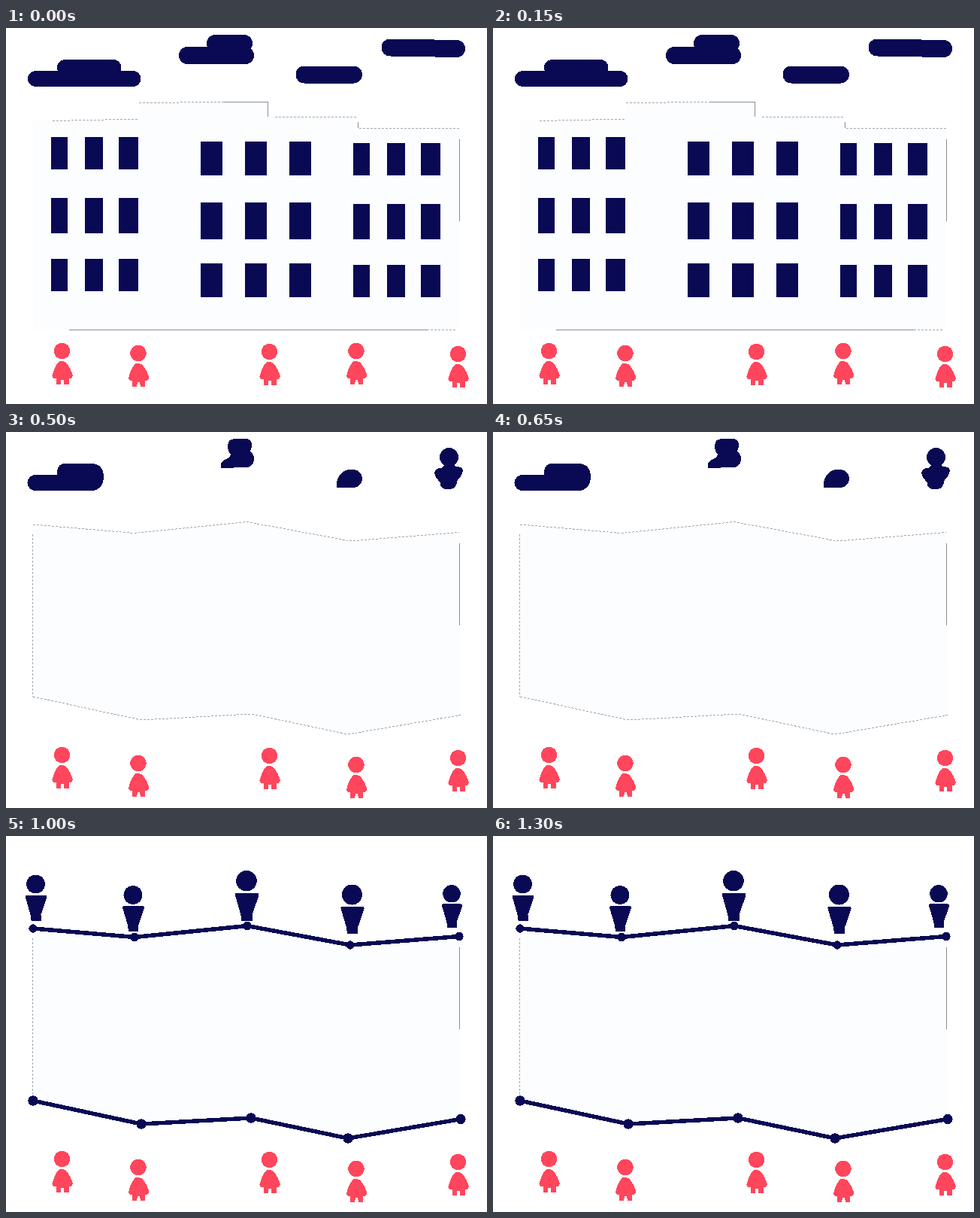
Recreate the animation shown at these times as an HTML page. Size 640x500 px, loop 1500 ms.

```html
<!DOCTYPE html>
<html lang="en">
<head>
<meta charset="utf-8">
<title>Building becomes a line chart</title>
<style>
html, body { margin: 0; height: 100%; overflow: hidden; background: #fff; }
svg { display: block; shape-rendering: crispEdges; }
.navy { fill: #090954; }
.red { fill: #ff465c; }
.wall { fill: #fcfdff; }
.edge, .line, .pill { fill: none; }
.edge { stroke: #8b8d91; }
.faint { stroke: #a5a7ab; stroke-dasharray: 3 2; }
.line, .pill { stroke: #090954; }
.line { stroke-width: 5.5; }
.pill { stroke-linecap: round; }
</style>
</head>
<body>
<!-- data-steps lists the steps in which a part is visible -->
<svg id="stage" width="640" height="500">
  <defs>
    <g id="girl">
      <circle r="10.7"/>
      <path d="M-4 14Q0 12.5 5 15Q12 23 14.5 33Q13 37 9 37V44.5H3L2 38H-1L-2 44.5H-8V37Q-12 37-13 33Q-10 20-4 14Z"/>
    </g>
    <g id="man">
      <circle cy="12.5" r="12.5"/>
      <path d="M-14 29Q-14 27-11 27H12Q15 27 15 30L7 53V61H-6L-7 53Z"/>
    </g>
  </defs>

  <g data-steps="0">
    <path class="wall" d="M36 124L177 121V99L348 98V118L468 119V133H603V401H36Z"/>
    <path class="edge faint" d="M62 123.5L177 121M177 99.5L290 98.5M358 118.5L468 119M470 133.5H603M560 401.5H600"/>
    <path class="edge" d="M290 98.5H348.5V118M468.5 125V133M603.5 148V257M84 401.5H560"/>
  </g>
  <path class="wall edge faint" data-steps="1" style="fill:#fcfdff"
    d="M34.5 124L182 119.5L327 97L462.5 117V133.5H603L606 385L457 403.5L325 389L180 402L36 374Z"/>
  <g data-steps="234">
    <polygon class="wall" id="area"/>
    <path class="edge faint" d="M35.5 136V352"/>
    <path class="edge" d="M603.5 148V257"/>
  </g>

  <g data-steps="01">
    <g class="navy" id="windows"></g>
    <path class="pill" stroke-width="21" d="M39.5 67.5H169M78.5 52.5H143"/>
    <path class="pill" stroke-width="23" d="M241.5 36.5H318.5M278.5 20.5H316.5M397 62H462.5M511 26L599.5 27.5"/>
  </g>
  <g class="navy" data-steps="2">
    <path d="M39 57H68V52Q69 42 79 42H116Q130 44 130 60Q129 77 114 78H39A10 10 0 0 1 39 57Z"/>
    <path d="M286 48V42Q289 37 297 34L299 30Q295 25 295 19Q295 9 305 9H318Q328 9 327 20L325 26Q331 30 330 38Q328 47 319 47Z"/>
    <path d="M440 74V66Q445 50 458 50H462A12 12 0 0 1 462 74Z"/>
    <circle cx="589.5" cy="33.5" r="12.5"/>
    <path d="M570 54Q571 48 579 48L583 44H596L599 46Q607 46 608 51Q607 59 601 63Q599 75 592 76H584Q577 74 578 67Q571 61 570 54Z"/>
  </g>
  <path class="navy" data-steps="3" d="M489 6Q520 17 572 17Q600 17 620 14V16Q596 20 570 21Q510 20 489 11Z"/>

  <g class="navy" data-steps="34" id="men"></g>
  <g data-steps="23" id="outline"></g>
  <g data-steps="4" id="series"></g>
  <g class="red" id="girls"></g>
</svg>
<script>
const STEP = 250, LOOP = 1500, LAST = 4;
const get = id => document.getElementById(id);

// A 3 by 3 grid; the middle row is taller and columns may widen to the right
function windowBlock(x, y, pitch, w, h, widen) {
  for (let i = 0; i < 9; i++) {
    const col = i % 3, row = Math.floor(i / 3);
    get('windows').innerHTML += `<rect x="${x + col * pitch}" y="${y + row * 81}"
      width="${w + col * widen}" height="${h + row % 2 * 4}"/>`;
  }
}
windowBlock(60, 145, 45, 22, 43, 2);
windowBlock(259, 151, 59, 29, 45, 0);
windowBlock(462, 153, 45, 22, 43, 2);

// The chart points also bound the area
const upper = [[36, 123], [171, 134.5], [321, 119.5], [458, 145], [603, 133.5]];
const lower = [[36, 352], [180, 383], [326, 375], [455, 402], [605, 376.5]];
get('area').setAttribute('points', [...upper, ...lower.toReversed()].join(' '));

function addSeries(points, r) {
  get('outline').innerHTML += `<polyline class="edge faint" points="${points.join(' ')}"/>`;
  get('series').innerHTML += `<polyline class="line" points="${points.join(' ')}"/>` +
    points.map(([x, y]) => `<circle class="navy" cx="${x}" cy="${y}" r="${r}"/>`).join('');
}
addSeries(upper, 5.7);
addSeries(lower, 6.7);

// x, top of the head, size
const men = [[39.5, 51.5, 1], [169, 66, 1], [320, 46, 1.1], [460.5, 64.5, 1.08], [593, 65, 0.94]];
get('men').innerHTML = men.map(([x, y, size]) =>
  `<use href="#man" transform="translate(${x} ${y}) scale(${size})"/>`).join('');

// x, y, final drop
const girls = [[74.5, 429.5, 0], [176, 432.5, 8], [350.5, 430.5, 0], [466, 429.5, 13], [601.5, 433.5, 0]];
get('girls').innerHTML = '<use href="#girl"/>'.repeat(girls.length);

function draw(step) {
  for (const part of document.querySelectorAll('[data-steps]'))
    part.style.display = part.dataset.steps.includes(step) ? '' : 'none';
  girls.forEach(([x, y, drop], i) => {
    const dy = [0, drop ? 7 : 5, drop][Math.min(step, 2)];
    get('girls').children[i].setAttribute('transform', `translate(${x} ${y + dy})`);
  });
}

const start = performance.now();
function tick() {
  const time = (performance.now() - start) % LOOP;
  draw(Math.min(LAST, Math.floor(time / STEP)));
  requestAnimationFrame(tick);
}
tick();
</script>
</body>
</html>
```
